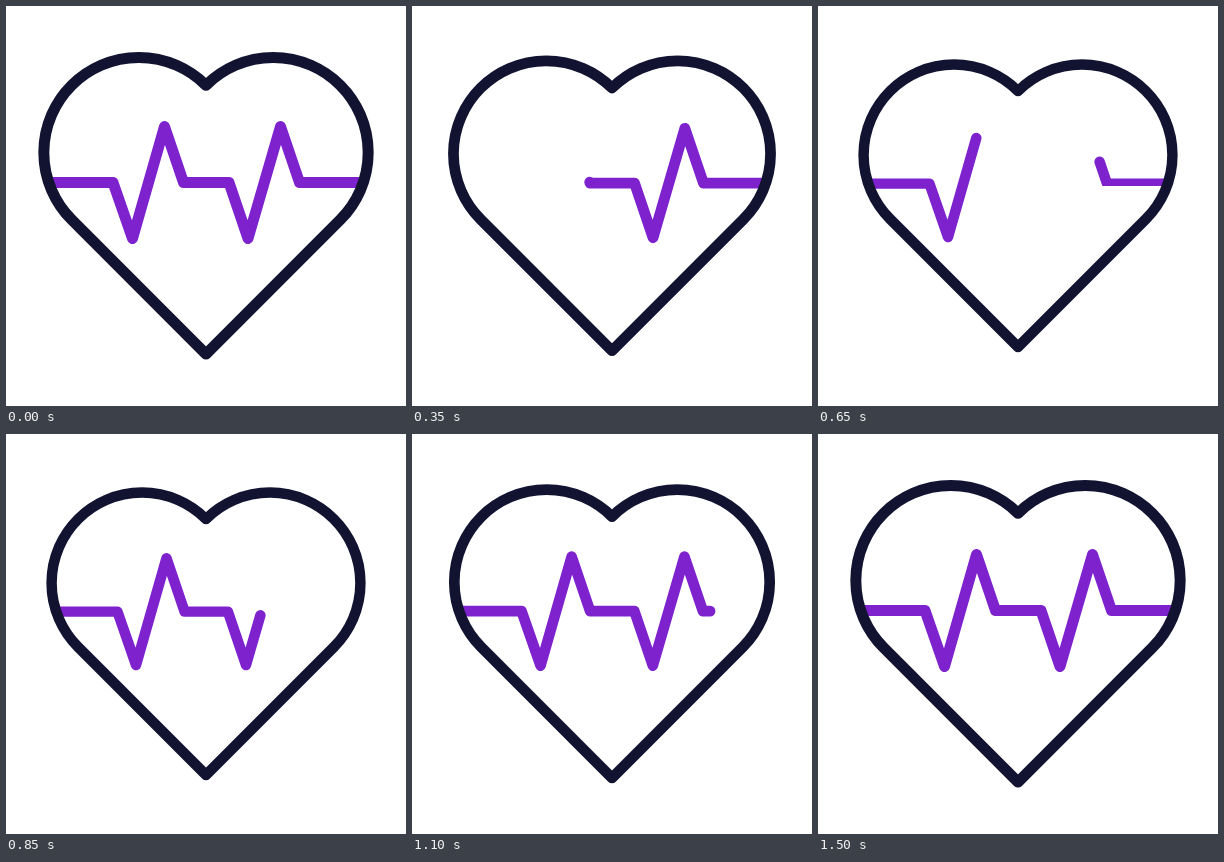
Recreate the animation shown at these times as an HTML page with a canvas. Size 400 by 400 pixels, loop 1520 ms.

```html
<!DOCTYPE html>
<html lang="en">
<head>
<meta charset="utf-8">
<title>Heartbeat</title>
<style>
  html, body { margin: 0; width: 100%; height: 100%; overflow: hidden; background: #fff; }
  canvas { display: block; width: 400px; height: 400px; }
</style>
</head>
<body>
<canvas id="stage" width="400" height="400"></canvas>
<script>
const ctx = document.getElementById('stage').getContext('2d');
const LOOP = 1520, STEP = 25, BEAT = 1500;
const INK = '#121331', PURPLE = '#7e22ce', WEIGHT = 11;

const pulsePoints = [
  [41, 176.5], [107, 176.5], [126.5, 232.5], [158.5, 120.5], [177.5, 176.5],
  [223, 176.5], [242, 232.5], [274.5, 120.5], [293.5, 176.5], [355, 176.5]
];
const pulse = new Path2D();
pulsePoints.forEach(([x, y]) => pulse.lineTo(x, y));
const pulseLength = pulsePoints.slice(1).reduce((sum, [x, y], i) =>
  sum + Math.hypot(x - pulsePoints[i][0], y - pulsePoints[i][1]), 0);

const heart = makeHeart(95, 146.5);

// Two round lobes, meeting in a notch, with tangent sides at 45 degrees.
function makeHeart(r, cy) {
  const path = new Path2D(), d = r / Math.SQRT2, q = Math.PI / 4;
  path.arc(200 - d, cy, r, -q, 3 * q, true);
  path.lineTo(200, cy + 3 * d);
  path.arc(200 + d, cy, r, q, -3 * q, true);
  path.closePath();
  return path;
}

function bezierEase(p, x1, y1, x2, y2) {
  const curve = (u, a, b) => 3 * (1 - u) ** 2 * u * a + 3 * (1 - u) * u * u * b + u ** 3;
  let lo = 0, hi = 1;
  for (let i = 0; i < 24; i++) {
    const mid = (lo + hi) / 2;
    if (curve(mid, x1, x2) < p) lo = mid; else hi = mid;
  }
  return curve(lo, y1, y2);
}

function strokePulse(from, to) {
  if (to <= from) return;
  ctx.setLineDash([(to - from) * pulseLength, 9999]);
  ctx.lineDashOffset = -from * pulseLength;
  ctx.stroke(pulse);
  ctx.setLineDash([]);
}

function draw(time) {
  const scale = 1 - 0.025 * (1 - Math.cos(2 * Math.PI * time / BEAT));
  ctx.setTransform(1, 0, 0, 1, 0, 0);
  ctx.fillStyle = '#fff';
  ctx.fillRect(0, 0, 400, 400);
  ctx.translate(200, 200);
  ctx.scale(scale, scale);
  ctx.translate(-200, -200);
  ctx.lineWidth = WEIGHT;
  ctx.lineCap = ctx.lineJoin = 'round';

  ctx.save();
  ctx.clip(heart);
  ctx.strokeStyle = PURPLE;
  const erased = Math.min(time / 750, 1);
  if (time < 500) {
    strokePulse(erased, 1);
  } else {
    strokePulse(0, bezierEase((time - 500) / 1000, 0.167, 0.32, 0.248, 1));
    // The outgoing line is cut off along its lower edge.
    ctx.beginPath();
    ctx.rect(0, 0, 400, 179);
    ctx.clip();
    strokePulse(erased, 1);
  }
  ctx.restore();

  ctx.strokeStyle = INK;
  ctx.stroke(heart);
}

const start = performance.now();
function tick() {
  const t = (performance.now() - start) % LOOP;
  const step = Math.floor((Math.floor(t / 10) * 10 + 5) / STEP);
  draw(Math.min(step * STEP, BEAT));
  requestAnimationFrame(tick);
}
tick();
</script>
</body>
</html>
```
